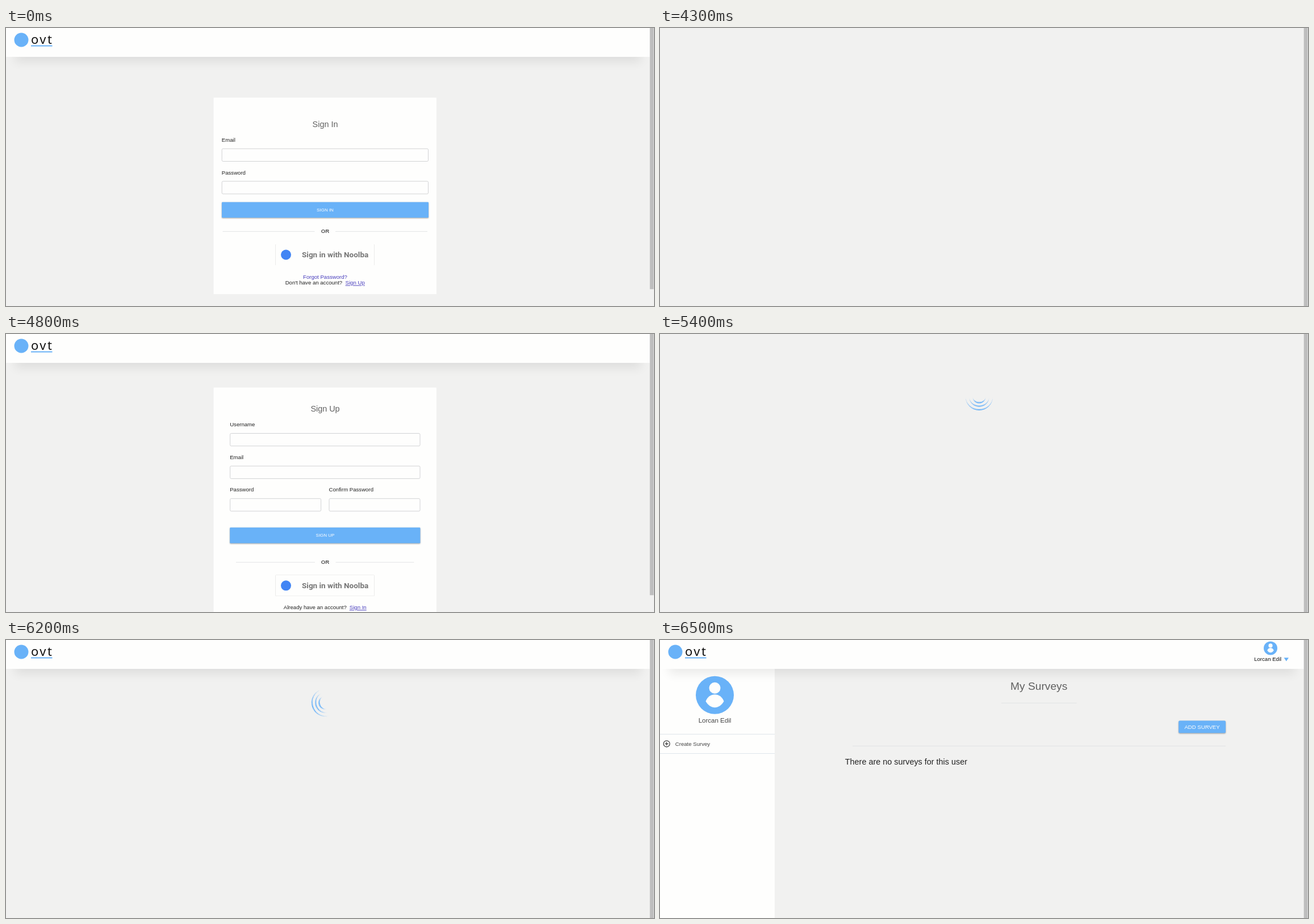
Write an HTML page that moves like this. It is 1141 by 491 pixels and loops after 8 s.

```html
<!DOCTYPE html>
<html lang="en">
<head>
<meta charset="utf-8">
<title>Survey sign-up</title>
<style>
  html, body { margin: 0; width: 100%; height: 100%; overflow: hidden; background: #f1f1f0; }
  svg { display: block; width: 1141px; height: 491px; }
  text { font: 9.6px "Liberation Sans", Arial, sans-serif; fill: #222; }
  .mid { text-anchor: middle; }
  .title { font-size: 14.4px; fill: #616161; }
  .head { font-size: 19.2px; fill: #616161; }
  .big { font-size: 14.4px; }
  .soft { fill: #444; }
  .bold { font-weight: bold; fill: #555; }
  .link { fill: #483dbd; }
  .under { text-decoration: underline; }
  .cap { font-size: 8px; fill: #fefefd; }
  .caps { fill: #fefefd; }
  .brand { font: 22px "Noto Sans", sans-serif; letter-spacing: 2.5px; fill: #111; }
  .partner { font: bold 13.5px Roboto, sans-serif; fill: #757575; }
  .white { fill: #fefefd; }
  .blue { fill: #69b2f8; }
  .field { fill: #fefefd; stroke: #cdcfd1; stroke-width: .9; }
  .rule { stroke: #dfe1e2; stroke-width: .9; }
  .btn { fill: #69b2f8; filter: drop-shadow(0 1px 1.3px rgba(0, 0, 0, .36)); }
  .raised { fill: #fefefd; filter: drop-shadow(0 .7px .7px rgba(0, 0, 0, .3)); }

  /* scene switching, 1% = 80 ms */
  .scene { animation: 8s step-end infinite; }
  .signin { animation-name: signin; }
  .signup { animation-name: signup; }
  .header { animation-name: header; }
  .bar { animation-name: bar; }
  .wait1 { animation-name: wait1; }
  .wait2 { animation-name: wait2; }
  .dash { animation-name: dash; }
  .user { animation-name: user; }
  .press { animation: press 8s step-end infinite; }
  @keyframes signin { 0% { visibility: visible } 53.75%, 100% { visibility: hidden } }
  @keyframes signup { 0%, 67.5%, 100% { visibility: hidden } 60% { visibility: visible } }
  @keyframes header { 0%, 60%, 75%, 100% { visibility: visible } 53.75%, 67.5% { visibility: hidden } }
  @keyframes bar { 0%, 60% { visibility: hidden } 53.75%, 67.5%, 100% { visibility: visible } }
  @keyframes wait1 { 0%, 60%, 75%, 100% { visibility: hidden } 55%, 67.5% { visibility: visible } }
  @keyframes wait2 { 0%, 78.75%, 100% { visibility: hidden } 75% { visibility: visible } }
  @keyframes dash { 0% { visibility: hidden } 78.75%, 100% { visibility: visible } }
  @keyframes user { 0% { visibility: hidden } 81.25%, 100% { visibility: visible } }
  @keyframes press {
    0%, 12.5%, 100% { filter: drop-shadow(0 1px 1.3px rgba(0, 0, 0, .36)) }
    10% { filter: drop-shadow(0 1px 1.3px rgba(0, 0, 0, .3)) }
  }

  .spin { animation: spin 1s linear infinite; }
  .wait1 .spin { animation-delay: -.6s; }
  @keyframes spin { to { transform: rotate(360deg) } }
</style>
</head>
<body>
<svg viewBox="0 0 1141 491">
  <defs>
    <filter id="blur" x="-10%" y="-100%" width="120%" height="300%"><feGaussianBlur stdDeviation="9"/></filter>
    <g id="partner">
      <rect class="raised" x="474.5" y="382" width="174" height="37" rx="1"/>
      <circle cx="493" cy="400.5" r="9" fill="#4285f4"/>
      <text class="partner" x="521" y="405.3">Sign in with Noolba</text>
    </g>
    <g id="avatar">
      <circle class="blue" r="33.5"/>
      <circle class="white" cy="-12.5" r="10"/>
      <path class="white" d="M-16 11C-13 3 -7 -1 0 -1S13 3 16 11C12 18 6 22 0 22S-12 18 -16 11Z"/>
    </g>
    <g id="arcs" class="blue">
      <path d="M-24 0A24 24 0 0 0 24 0A24 22.1 0 0 1 -24 0Z"/>
      <path d="M-17.7 0A17.7 17.7 0 0 0 17.7 0A17.7 15.8 0 0 1 -17.7 0Z"/>
      <path d="M-11.5 0A11.5 11.5 0 0 0 11.5 0A11.5 9.6 0 0 1 -11.5 0Z"/>
    </g>
  </defs>

  <rect width="1141" height="491" fill="#f1f1f0"/>

  <g class="scene dash">
    <rect class="white" y="51" width="202" height="440"/>
  </g>

  <g class="scene header">
    <rect x="16" y="24" width="1102" height="36" opacity=".075" filter="url(#blur)"/>
    <rect class="white" width="1134" height="51"/>
    <circle class="blue" cx="27" cy="21" r="12.5"/>
    <text class="brand" x="44" y="28">ovt</text>
    <rect class="blue" x="44" y="30.5" width="37.5" height="2"/>
  </g>

  <g class="scene signin">
    <rect class="white" x="365.5" y="123" width="392.5" height="347"/>
    <text class="title mid" x="562" y="175">Sign In</text>
    <text x="379.8" y="201">Email</text>
    <rect class="field" x="380.2" y="213.2" width="363.3" height="22.3" rx="2"/>
    <text x="379.8" y="258.6">Password</text>
    <rect class="field" x="380.2" y="270.7" width="363.3" height="22.3" rx="2"/>
    <rect class="btn press" x="380" y="307.4" width="364" height="27.6" rx="1.2"/>
    <text class="cap mid" x="562" y="324">SIGN IN</text>
    <path class="rule" d="M381.5 359.4H543.5M580 359.4H742"/>
    <text class="bold mid" x="562" y="362.4">OR</text>
    <use href="#partner"/>
    <text class="link mid" x="562" y="442.6">Forgot Password?</text>
    <text x="491.7" y="453.4">Don't have an account?</text>
    <text class="link under" x="597.6" y="453.4">Sign Up</text>
  </g>

  <g class="scene signup">
    <rect class="white" x="365.5" y="94.7" width="392.5" height="397"/>
    <text class="title mid" x="562" y="137">Sign Up</text>
    <text x="394.2" y="163.2">Username</text>
    <rect class="field" x="394.6" y="175.6" width="334.4" height="22.2" rx="2"/>
    <text x="394.2" y="220.8">Email</text>
    <rect class="field" x="394.6" y="233.2" width="334.4" height="22.2" rx="2"/>
    <text x="394.2" y="278.4">Password</text>
    <rect class="field" x="394.6" y="290.7" width="160" height="22.2" rx="2"/>
    <text x="568.6" y="278.4">Confirm Password</text>
    <rect class="field" x="569" y="290.7" width="160" height="22.2" rx="2"/>
    <rect class="btn" x="394.2" y="341.8" width="335.2" height="27.6" rx="1.2"/>
    <text class="cap mid" x="562" y="358.3">SIGN UP</text>
    <path class="rule" d="M405 403.2H544M580.5 403.2H718.5"/>
    <text class="bold mid" x="562" y="406.2">OR</text>
    <use href="#partner" y="43.8"/>
    <text x="488.8" y="486.3">Already have an account?</text>
    <text class="link under" x="604.8" y="486.3">Sign In</text>
  </g>

  <g class="scene wait1" transform="translate(562 110.8)"><use class="spin" href="#arcs"/></g>
  <g class="scene wait2" transform="translate(562 110.8)"><use class="spin" href="#arcs"/></g>

  <g class="scene dash">
    <use href="#avatar" x="96.5" y="97.3"/>
    <text class="soft mid" x="96.5" y="145.9" style="font-size:11.5px">Lorcan Edil</text>
    <path d="M0 166.4H202M0 200.5H202" stroke="#dbe3ea" stroke-width=".9"/>
    <path d="M8.7 183.3H14.7M11.7 180.3V186.3" stroke="#333" stroke-width="1.2"/>
    <circle cx="11.7" cy="183.3" r="5.5" fill="none" stroke="#333" stroke-width="1.2"/>
    <text class="soft" x="26.8" y="186.5">Create Survey</text>
    <text class="head mid" x="667.2" y="88.2">My Surveys</text>
    <path class="rule" d="M601 111.3H733.5M339 187.2H996"/>
    <rect class="btn" x="913.2" y="142.6" width="82.8" height="21.6" rx="2"/>
    <text class="caps mid" x="954.5" y="156.7">ADD SURVEY</text>
    <text class="big" x="325.8" y="220">There are no surveys for this user</text>
  </g>

  <g class="scene user">
    <use href="#avatar" transform="translate(1075 14.4) scale(.358)"/>
    <text x="1046.2" y="37.2" style="fill:#111">Lorcan Edil</text>
    <path class="blue" d="M1098.6 31.2H1107L1102.8 37.4Z"/>
  </g>

  <rect x="1133.7" width="7.3" height="491" fill="#f1f1f0"/>
  <rect x="1133.7" width="6.8" height="461.3" fill="#bebebe"/>
  <rect class="scene bar" x="1133.7" y="461" width="6.8" height="30" fill="#bebebe"/>
</svg>
</body>
</html>
```
